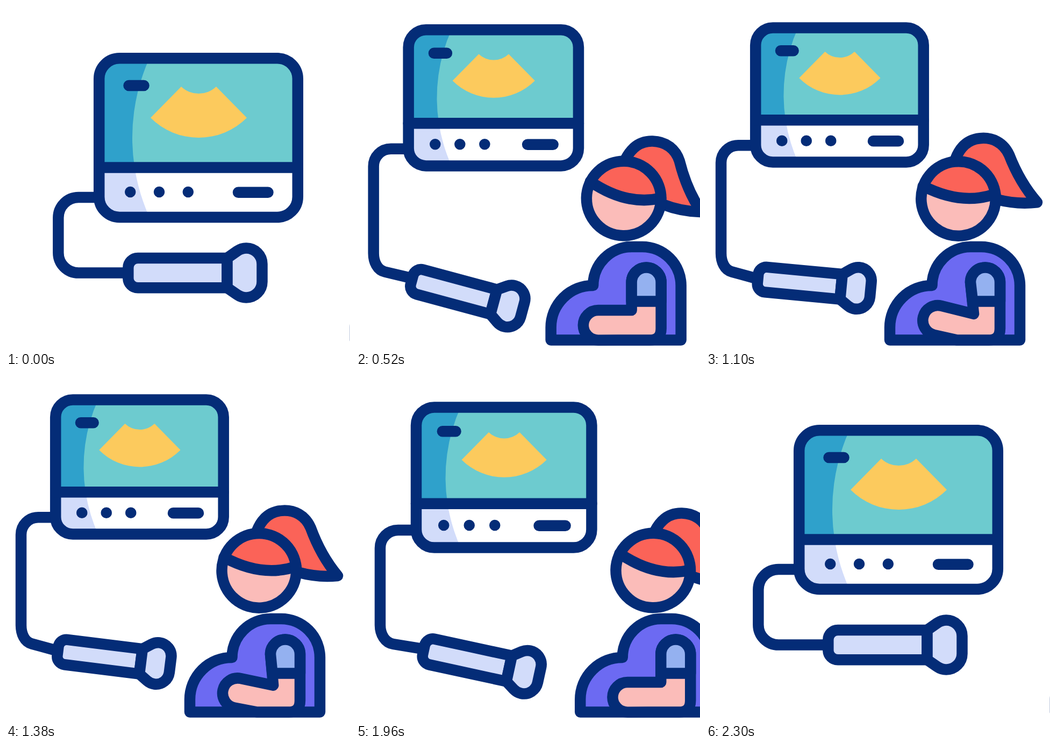
These frames come from a looping animation (640 px wide and 640 px high, 2400 ms). An HTML page:

```html
<!DOCTYPE html>
<html lang="en">
<head>
<meta charset="utf-8">
<title>Ultrasound scan</title>
<style>
  html, body { margin: 0; width: 100%; height: 100%; overflow: hidden; background: #fff; }
  svg { display: block; width: 100%; height: 100%; }
  .line { fill: none; stroke: #042c77; }
  .lavender { fill: #d2dcfa; }
  .skin { fill: #fbbcb9; }
  .hair { fill: #fb6358; }
</style>
</head>
<body>
<svg viewBox="0 0 640 640" stroke-width="20.5" stroke-linecap="round" stroke-linejoin="round">
  <path id="cable" class="line"/>

  <g id="monitor">
    <rect x="173.2" y="97.3" width="369.6" height="295.7" rx="38" fill="#fff"/>
    <path fill="#6dcbcf" d="M173 300V135a38 38 0 0 1 38-38H505a38 38 0 0 1 38 38V300Z"/>
    <path fill="#2fa1cb" d="M173 300V135a38 38 0 0 1 38-38H266.8A360 360 0 0 0 239.2 300Z"/>
    <path class="lavender" d="M239.2 300A360 360 0 0 0 266.8 393H211a38 38 0 0 1-38-38V300Z"/>
    <path fill="#fcca5d" d="M326 150L269 208A126.7 126.7 0 0 0 448 208L391 150A47 47 0 0 1 326 150Z"/>
    <rect class="line" x="173.2" y="97.3" width="369.6" height="295.7" rx="38"/>
    <path class="line" d="M173.2 300.5H542.8M228.5 148H256.5M432 346.7H487.5M231.2 346h.01M285 346h.01M338.8 346h.01"/>
  </g>

  <g id="wand" class="line">
    <path class="lavender" d="M411.5 469H245.3a18 18 0 0 0-18 18V506.3a18 18 0 0 0 18 18H411.5Z"/>
    <path class="lavender" d="M411.5 469L430 456Q438 450.5 447 450.5A29.5 29.5 0 0 1 476.5 480V513A29.5 29.5 0 0 1 447 542.5Q438 542.5 430 537L411.5 524.3Z"/>
  </g>

  <g id="woman">
    <path class="line" style="fill:#6c6af2" d="M342 621.5V598A78 78 0 0 1 420.5 520A72 72 0 0 1 492 448H512A72 72 0 0 1 584 520V621.5Z"/>
    <path id="arm" class="line skin"/>
    <path id="sleeve" class="line" style="fill:#94b1f0"/>
    <g id="head">
      <path class="line hair" d="M478 284C489 262 505 250.3 527 250.3C551 250.3 570 263 578 286C586 315 600 350 621 379.5C597 380 570 375 548 367Z"/>
      <circle class="skin" cx="476" cy="358" r="69.3"/>
      <path class="hair" d="M413 328Q481 372 545 356A69.3 69.3 0 0 0 413 328Z"/>
      <path class="line" d="M413 328Q481 372 545 356"/>
      <circle class="line" cx="476" cy="358" r="69.3"/>
    </g>
  </g>
</svg>
<script>
const LOOP = 2400;
const set = (id, attrs) => {
  const el = document.getElementById(id);
  for (const name in attrs) el.setAttribute(name, attrs[name]);
};
const lerp = (a, b, k) => a + (b - a) * k;
const ease = (t, from, to) => {
  const u = Math.min(1, Math.max(0, (t - from) / (to - from)));
  return u * u * (3 - 2 * u);
};
const rotate = (x, y, deg, cx, cy) => {
  const a = deg * Math.PI / 180, c = Math.cos(a), s = Math.sin(a);
  return [cx + (x - cx) * c - (y - cy) * s, cy + (x - cx) * s + (y - cy) * c];
};

function draw(time) {
  // The second half mirrors the first.
  const t = Math.min(time, LOOP - time);
  const shift = ease(t, 100, 600);
  const tilt = ease(t, 600, 1200);
  const mix = (a, b) => lerp(a, b, shift);

  const scale = mix(1, 0.8455), stroke = 20.5 / scale;
  set('monitor', {
    'stroke-width': stroke,
    transform: `translate(${mix(173.2, 92.2)} ${mix(97.3, 40.5)}) scale(${scale}) translate(-173.2 -97.3)`
  });

  const left = mix(97.3, 28), top = mix(356, 259.3);
  set('cable', { d: `M${mix(173, 92)} ${top}H${mix(135, 60)}
    C${mix(114, 42)} ${top} ${left} ${mix(373, 273.6)} ${left} ${mix(394, 291.4)}
    V${mix(459, 460)}C${left} ${mix(480, 476)} ${mix(114, 34.5)} ${mix(496.5, 491)} ${mix(135, 48)} ${mix(496.5, 494.5)}
    L${mix(227, 92)} ${mix(496.5, 506.5)}` });

  const bulge = 4 * shift * (1 - shift);
  set('wand', {
    'stroke-width': stroke,
    transform: `translate(${mix(207.7, 80) - 3 * bulge} ${mix(496.5, 506) - 1.8 * bulge})
      rotate(${16.2 * shift - 11.66 * tilt}) scale(${scale}) translate(-207.7 -496.5)`
  });

  set('woman', { transform: `translate(${mix(308, 0)} 0)` });
  set('head', { transform: `rotate(${1.36 - 7.7 * tilt} 477.5 422)` });

  const forearm = (x, y) => rotate(x, y, 15.1 * tilt, 467, 594);
  const wrist = forearm(492, 566);
  const cuff = lerp(492, wrist[0], 0.67);
  const arch = 'V514A27.5 27.5 0 0 0 492 514';
  set('arm', { d: `M${wrist}L492 514A27.5 27.5 0 0 1 547 514V600Q547 621.5 526 621.5H467
    L${forearm(430, 621.7)}A27.85 27.85 0 0 1 ${forearm(430, 566)}Z` });
  set('sleeve', { d: `M${cuff} 549.5H547${arch}Z` });
}

function tick() {
  draw(performance.now() % LOOP);
  requestAnimationFrame(tick);
}
tick();
</script>
</body>
</html>
```
